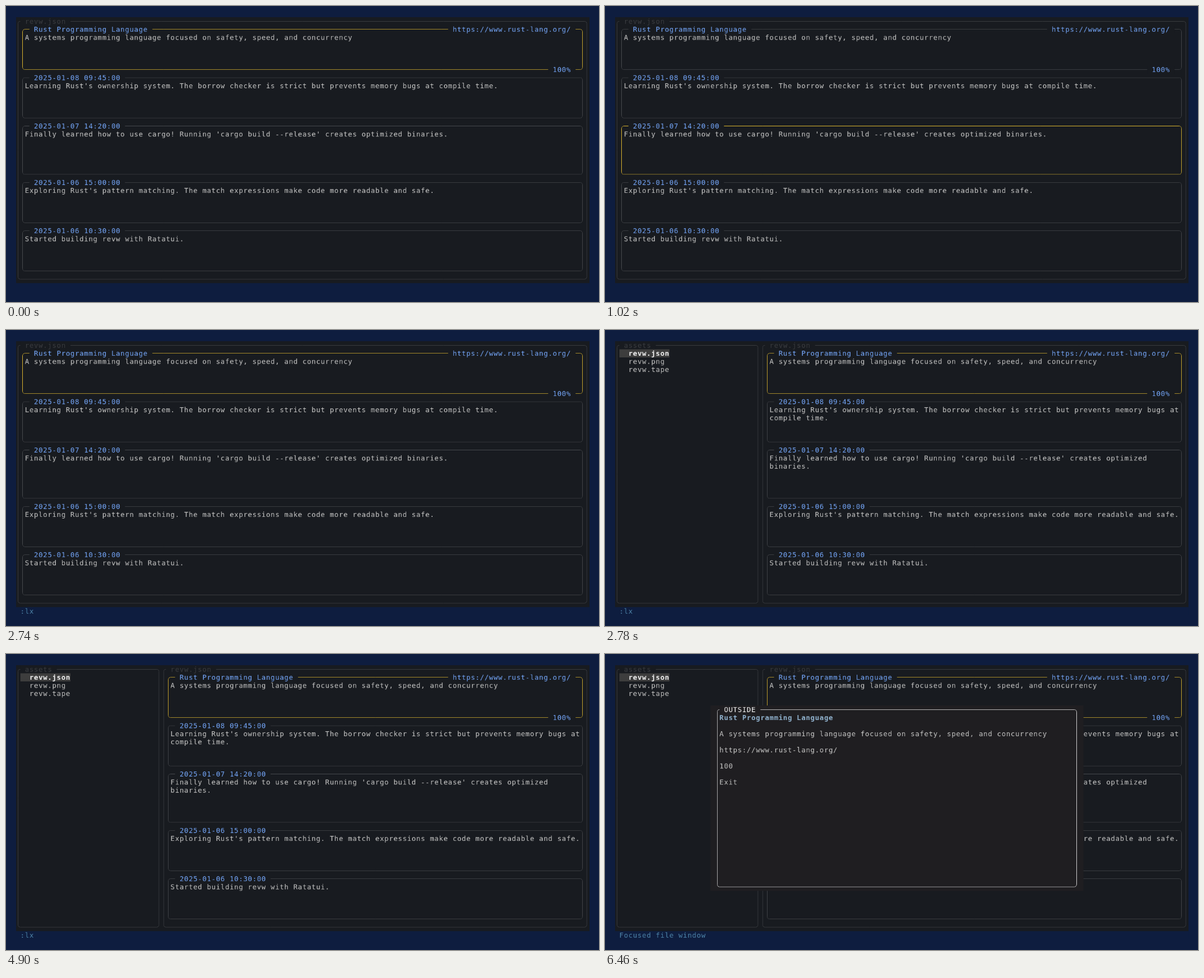
Recreate the animation shown at these times as an HTML page with a canvas. Size 1058 px wide and 529 px high, loop 8 s.

```html
<!DOCTYPE html>
<html lang="en">
<head>
<meta charset="utf-8">
<title>revw</title>
<style>
html, body { margin: 0; width: 100%; height: 100%; overflow: hidden; background: #0e1d3f; }
canvas { display: block; }
</style>
</head>
<body>
<canvas id="stage" width="1058" height="529"></canvas>
<script>
const LOOP = 8000;

// Terminal grid in its own pixels, and where it lands on the stage
const COLS = 126, ROWS = 33;
const CW = 11.84, CH = 21;
const SCALE = 14.4 / CH, LEFT = 17.5, TOP = 20.1;
const FONT = '18px "DejaVu Sans Mono", monospace';

const stage = document.getElementById('stage').getContext('2d');
const term = document.createElement('canvas');
term.width = Math.ceil(COLS * CW);
term.height = (ROWS + 1) * CH;
const ctx = term.getContext('2d');

const C = {
  margin: '#0e1d3f', panel: '#181b20', popup: '#1f1e21', mark: '#3d3d3d',
  border: '#47494d', faint: '#3b3d41', focus: '#dcb62f', white: '#f6f6f6',
  text: '#c6c6c5', blue: '#75a7fa', head: '#92b4d0', status: '#4d83a8'
};

const ABOUT = 'A systems programming language focused on safety, speed, and concurrency';
const NAME = 'Rust Programming Language';
const URL_TEXT = 'https://www.rust-lang.org/';
const CARDS = [
  { top: 1, bottom: 6, title: NAME, body: ABOUT, url: URL_TEXT, score: '100%' },
  { top: 7, bottom: 12, title: '2025-01-08 09:45:00',
    body: "Learning Rust's ownership system. The borrow checker is strict but prevents memory bugs at compile time." },
  { top: 13, bottom: 19, title: '2025-01-07 14:20:00',
    body: "Finally learned how to use cargo! Running 'cargo build --release' creates optimized binaries." },
  { top: 20, bottom: 25, title: '2025-01-06 15:00:00',
    body: "Exploring Rust's pattern matching. The match expressions make code more readable and safe." },
  { top: 26, bottom: 31, title: '2025-01-06 10:30:00', body: 'Started building revw with Ratatui.' }
];
const FILES = ['revw.json', 'revw.png', 'revw.tape'];

// Each entry: [start time, value]
const CARD_AT = [[0, 0], [500, 1], [1020, 2], [1580, 1], [2100, 0]];
const FILE_AT = [[0, 0], [3300, 1], [3820, 2], [4380, 1], [4900, 0]];
const STATUS_AT = [[0, ''], [2620, ':'], [2660, ':l'], [2740, ':lx'], [5940, 'Focused file window']];
const SPLIT_AT = 2780, POPUP_AT = 6460;

const valueAt = (track, t) => track.filter(([start]) => start <= t).pop()[1];
const snap = v => Math.floor(v) + 0.5;
const midX = col => snap((col + 0.5) * CW);
const midY = row => snap((row + 0.5) * CH);

function fill(col, row, cols, rows, color) {
  ctx.fillStyle = color;
  ctx.fillRect(col * CW, row * CH, cols * CW, rows * CH);
}

function text(col, row, str, color, bold) {
  ctx.font = (bold ? 'bold ' : '') + FONT;
  ctx.fillStyle = color;
  ctx.fillText(str, col * CW, row * CH + 17);
}

function box(left, top, right, bottom, color) {
  const x = midX(left), y = midY(top);
  ctx.strokeStyle = color;
  ctx.beginPath();
  ctx.roundRect(x, y, midX(right) - x, midY(bottom) - y, 6);
  ctx.stroke();
}

// Text that interrupts a border, with one blank cell on each side
function label(col, row, str, color, bg = C.panel) {
  fill(col - 1, row, str.length + 2, 1, bg);
  text(col, row, str, color);
}

function panel(left, right, title) {
  box(left, 0, right, ROWS - 1, C.border);
  label(left + 2, 0, title, C.faint);
}

function card({ top, bottom, title, body, url, score }, left, focused) {
  const right = COLS - 2, width = right - left - 1;
  box(left, top, right, bottom, focused ? C.focus : C.border);
  label(left + 3, top, title, C.blue);
  if (url) label(right - 2 - url.length, top, url, C.blue);
  if (score) label(right - 2 - score.length, bottom, score, C.blue);
  const lines = body.match(new RegExp(`\\S.{0,${width - 1}}(?= |$)`, 'g'));
  lines.forEach((line, i) => text(left + 1, top + 1 + i, line, C.text));
}

function fileList(selected) {
  panel(0, 31, 'assets');
  FILES.forEach((name, i) => {
    const on = i === selected;
    if (on) fill(1, i + 1, name.length + 2, 1, C.mark);
    text(3, i + 1, name, on ? C.white : C.text, on);
  });
}

function popup() {
  fill(21, 5, 82, 23, C.popup);
  box(22, 5, 101, 27, C.white);
  label(24, 5, 'OUTSIDE', C.white, C.popup);
  text(23, 6, NAME, C.head, true);
  [ABOUT, URL_TEXT, '100', 'Exit'].forEach((line, i) => text(23, 8 + 2 * i, line, C.text));
}

function draw(t) {
  const split = t >= SPLIT_AT, left = split ? 32 : 0;
  const focus = valueAt(CARD_AT, t);
  fill(0, 0, COLS, ROWS, C.panel);
  fill(0, ROWS, COLS, 1, C.margin);
  if (split) fileList(valueAt(FILE_AT, t));
  panel(left, COLS - 1, 'revw.json');
  CARDS.forEach((c, i) => card(c, left + 1, i === focus));
  text(1, ROWS, valueAt(STATUS_AT, t), C.status);
  if (t >= POPUP_AT) popup();

  stage.fillStyle = C.margin;
  stage.fillRect(0, 0, 1058, 529);
  stage.drawImage(term, LEFT, TOP, term.width * SCALE, term.height * SCALE);
}

stage.imageSmoothingQuality = 'high';
ctx.lineWidth = 1;
ctx.font = FONT;
ctx.letterSpacing = CW - ctx.measureText('M').width + 'px';
const start = performance.now();
function tick() {
  draw((performance.now() - start) % LOOP);
  requestAnimationFrame(tick);
}
tick();
</script>
</body>
</html>
```
